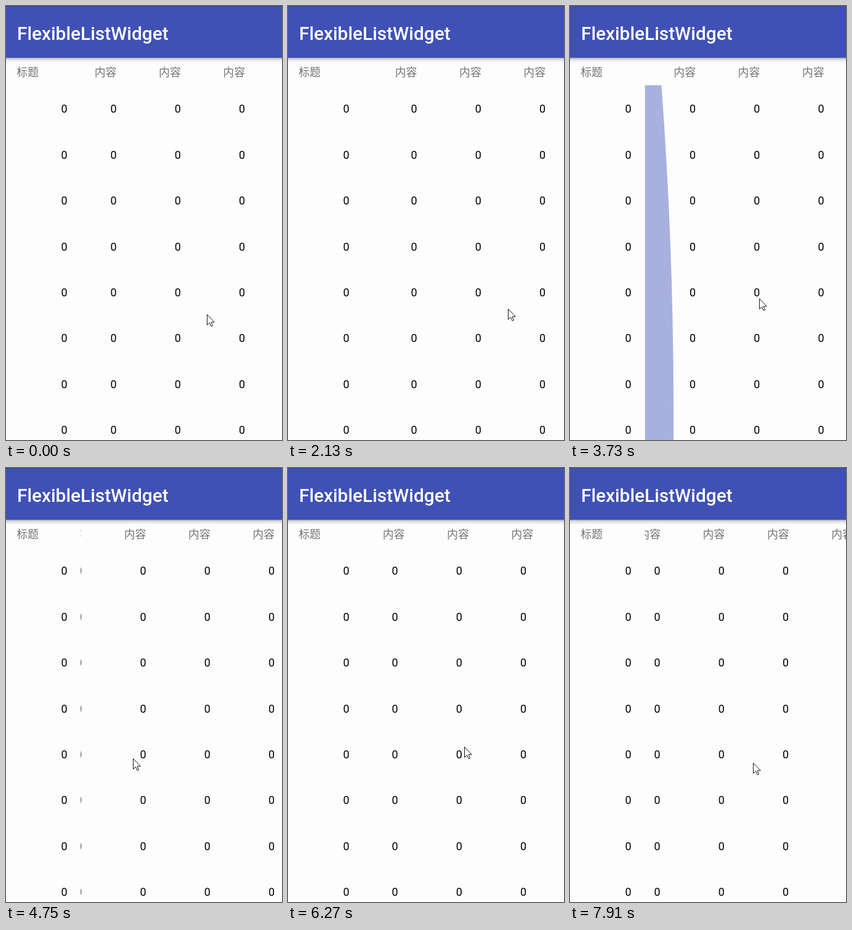
Write an HTML page that moves like this. It is 448 px wide and 704 px high and loops after 8000 ms.

```html
<!DOCTYPE html>
<html lang="zh-CN">
<head>
<meta charset="utf-8">
<title>FlexibleListWidget</title>
<style>
  html, body { margin: 0; width: 100%; height: 100%; overflow: hidden; background: #fdfdfd; }
  svg { display: block; width: 448px; height: 704px; }
  text { font-family: Roboto, "Noto Sans CJK SC", "Noto Sans CJK", sans-serif; font-size: 17.9px; }
  .head { fill: #757575; }
  .num { fill: #000; text-anchor: end; }
  .cell { text-anchor: end; }
  .bar { fill: #fff; font-size: 29.8px; font-weight: 500; }
</style>
</head>
<body>
<svg viewBox="0 0 448 704">
  <defs>
    <clipPath id="pane"><rect x="121.5" y="84" width="327" height="620"/></clipPath>
    <linearGradient id="shade" x2="0" y2="1">
      <stop offset="0" stop-color="#000" stop-opacity=".32"/>
      <stop offset=".35" stop-color="#000" stop-opacity=".12"/>
      <stop offset="1" stop-color="#000" stop-opacity="0"/>
    </linearGradient>
  </defs>
  <rect width="448" height="704" fill="#fdfdfd"/>
  <g id="titles"><text class="head" x="17.2" y="113.5">标题</text></g>
  <g clip-path="url(#pane)">
    <path id="pull" fill="#a8b0de"/>
    <g id="heads"></g>
    <g id="nums"></g>
  </g>
  <rect y="84" width="448" height="8" fill="url(#shade)"/>
  <rect width="448" height="84" fill="#3f51b5"/>
  <rect width="448" height="1" fill="#3243a0"/>
  <text class="bar" x="18" y="54.5">FlexibleListWidget</text>
  <path id="cursor" d="M0 0V17L4 13.3 6.6 19.2 9 18.2 6.5 12.4H11.8Z" fill="#fff" stroke="#111122" stroke-width="1"/>
</svg>
<script>
const LOOP = 8000, COLS = 8, ROWS = 8, COL_W = 104.3, ROW_H = 74.45, EDGE = 121.5;
const $ = id => document.getElementById(id);

function addText(parent, cls, x, y, str) {
  const el = document.createElementNS('http://www.w3.org/2000/svg', 'text');
  el.setAttribute('class', cls);
  el.setAttribute('x', x);
  el.setAttribute('y', y);
  el.textContent = str;
  parent.append(el);
}

for (let r = 0; r < ROWS; r++) {
  const y = 173.2 + r * ROW_H;
  addText($('titles'), 'num', 99.6, y, '0');
  for (let c = 0; c < COLS; c++) addText($('nums'), 'num', 157.2 + c * COL_W, y, '0');
}
for (let c = 0; c < COLS; c++) addText($('heads'), 'head cell', 157.2 + c * COL_W, 113.5, '内容');

// screen refreshes: first time, last time, count
const ticks = [0];
for (const [a, b, n] of [
  [130, 550, 4], [700, 1130, 4], [1280, 2130, 7], [2260, 3080, 7],
  [3220, 4390, 10], [4510, 4750, 3], [4900, 6270, 11], [6390, 7910, 12]
]) for (let i = 0; i < n; i++) ticks.push(Math.round(a + (b - a) * i / (n - 1)));

// time, header shift, list shift, pointer x, pointer y
const keys = [
  [0, -82, -82, 326, 500],
  [550, -108, -146, 301, 509],
  [1000, -166, -176, 254, 508],
  [1350, -158, -158, 252, 505],
  [2130, -52, -52, 357, 491],
  [2400, -14, -14, 350, 488],
  [2620, 4, 4, 280, 482],
  [3080, 69, 69, 334, 475],
  [3340, 66, 66, 331, 475],
  [4750, -34, -34, 206, 471],
  [5300, -118, -120, 232, 462],
  [6270, -72, -83, 286, 452],
  [6950, -32, -34, 332, 462],
  [7910, -114.4, -115, 297, 478],
  [8000, -114.4, -115, 297, 478]
];

function pose(t) {
  const i = Math.max(1, keys.findIndex(k => k[0] >= t));
  const a = keys[i - 1], b = keys[i];
  const u = (t - a[0]) / (b[0] - a[0]);
  return a.map((v, j) => v + (b[j] - v) * u);
}

// stretched sheet: a bow that runs past the bottom of the screen
function pullPath(w) {
  if (w <= 0) return '';
  const near = EDGE + w * .575, ctrl = EDGE + w * 1.415;
  return `M${EDGE} 128.5H${near}Q${ctrl} 660 ${near} 1191H${EDGE}Z`;
}

const move = (id, x, y) => $(id).setAttribute('transform', `translate(${x} ${y})`);

function draw(now) {
  const t = now % LOOP;
  const [, head, list, x, y] = pose(ticks.filter(k => k <= t).pop());
  move('heads', head, 0);
  move('nums', list, 0);
  move('cursor', x + .5, y + .5);
  $('pull').setAttribute('d', pullPath(list));
}

const start = performance.now();
function frame() {
  draw(performance.now() - start);
  requestAnimationFrame(frame);
}
frame();
</script>
</body>
</html>
```
